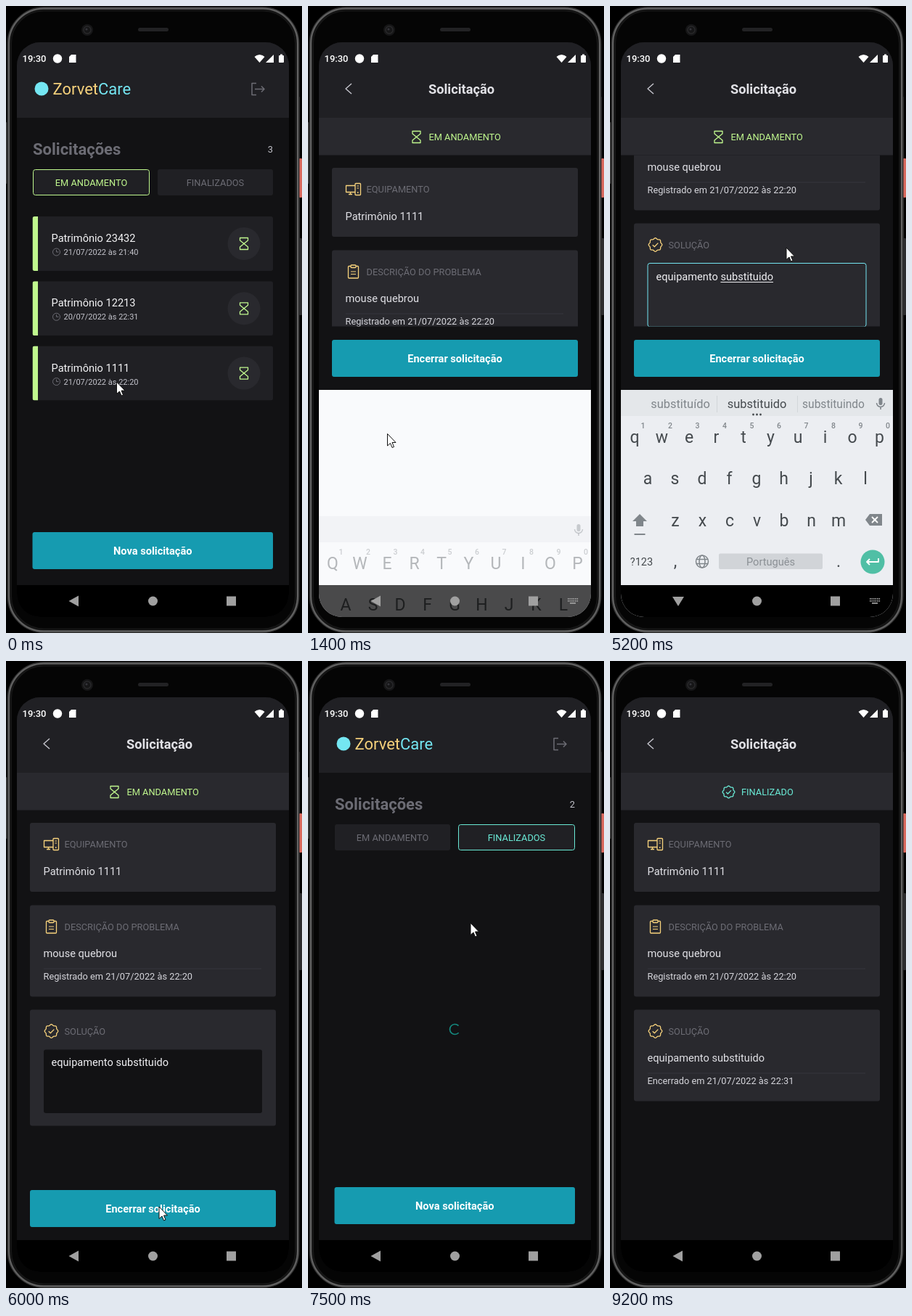
Write an HTML page with a canvas that moves like this. It is 408 px wide and 864 px high and loops after 9600 ms.

```html
<!DOCTYPE html>
<html lang="pt-BR">
<head>
<meta charset="utf-8">
<title>Solicitações</title>
<style>
html, body { margin: 0; width: 100%; height: 100%; overflow: hidden; background: #000; }
canvas { display: block; width: 408px; height: 864px; }
</style>
</head>
<body>
<canvas id="stage"></canvas>
<script>
const LOOP = 9600, STEP = 100;
const canvas = document.getElementById('stage');
const ctx = canvas.getContext('2d');
const ratio = window.devicePixelRatio || 1;
canvas.width = 408 * ratio;
canvas.height = 864 * ratio;

const C = {
  bg: '#121214', panel: '#202024', card: '#29292e', line: '#36363c',
  muted: '#6c6c74', soft: '#c4c4cc', text: '#e1e1e6', button: '#169bb0',
  open: '#c0f88e', done: '#6aead6', gold: '#f7d27c', sky: '#74e6f2', spin: '#14897f'
};
const SMALL = 12.8, BODY = 14.6;

// Drawing helpers
function box(x, y, w, h, r, fill, stroke, lw = 1) {
  ctx.beginPath();
  ctx.roundRect(x, y, w, h, r);
  if (fill) { ctx.fillStyle = fill; ctx.fill(); }
  if (stroke) { ctx.strokeStyle = stroke; ctx.lineWidth = lw; ctx.stroke(); }
}
function disc(x, y, r, fill) {
  ctx.beginPath();
  ctx.arc(x, y, r, 0, Math.PI * 2);
  ctx.fillStyle = fill;
  ctx.fill();
}
function ring(x, y, r, color, lw, from = 0, to = Math.PI * 2) {
  ctx.beginPath();
  ctx.arc(x, y, r, from, to);
  ctx.strokeStyle = color;
  ctx.lineWidth = lw;
  ctx.stroke();
}
function trace(points, x = 0, y = 0, close = false) {
  ctx.beginPath();
  points.forEach(([px, py], i) => i ? ctx.lineTo(x + px, y + py) : ctx.moveTo(x + px, y + py));
  if (close) ctx.closePath();
}
function line(points, x, y, color, lw = 1.4, close = false) {
  trace(points, x, y, close);
  ctx.strokeStyle = color;
  ctx.lineWidth = lw;
  ctx.stroke();
}
function shape(points, x, y, fill) {
  trace(points, x, y, true);
  ctx.fillStyle = fill;
  ctx.fill();
}
function setFont(size, weight = 400) {
  ctx.font = `${weight} ${size}px Roboto, sans-serif`;
}
function text(str, x, y, size, color, weight = 400, align = 'left') {
  setFont(size, weight);
  ctx.textAlign = align;
  ctx.fillStyle = color;
  ctx.fillText(str, x, y);
}
function clipTo(x, y, w, h, r, draw) {
  ctx.save();
  ctx.beginPath();
  ctx.roundRect(x, y, w, h, r);
  ctx.clip();
  draw();
  ctx.restore();
}

// Icons
function hourglass(x, y, color) {
  line([[-5.5, -8], [5.5, -8], [5.5, -4.5], [0, 0], [5.5, 4.5], [5.5, 8],
    [-5.5, 8], [-5.5, 4.5], [0, 0], [-5.5, -4.5]], x, y, color, 1.3, true);
}
function badge(x, y, color, size = 1) {
  const rim = Array.from({ length: 64 }, (_, i) => {
    const a = i / 64 * Math.PI * 2, r = size * (8.6 + 0.7 * Math.cos(8 * a));
    return [r * Math.cos(a), r * Math.sin(a)];
  });
  line(rim, x, y, color, 1.3, true);
  const tick = [[-3.8, 0.3], [-1.2, 2.8], [3.8, -2.4]];
  line(tick.map(p => p.map(v => v * size)), x, y, color, 1.3);
}
function computer(x, y, color) {
  box(x + 2.5, y - 8, 7.5, 16, 1, null, color, 1.3);
  line([[5, -4.5], [7.5, -4.5]], x, y, color, 1.2);
  line([[5, -1.5], [7.5, -1.5]], x, y, color, 1.2);
  disc(x + 6.25, y + 4.5, 0.9, color);
  line([[2.5, -5], [-10, -5], [-10, 4], [2.5, 4]], x, y, color, 1.3);
  line([[-4, 4], [-4, 7]], x, y, color, 1.3);
  line([[-6.5, 7], [-1.5, 7]], x, y, color, 1.3);
}
function clipboard(x, y, color) {
  box(x - 7, y - 7.5, 14, 16.5, 1, null, color, 1.3);
  box(x - 3.5, y - 9, 7, 3.5, 1, C.card, color, 1.3);
  line([[-3.5, 0], [3.5, 0]], x, y, color, 1.2);
  line([[-3.5, 3.5], [3.5, 3.5]], x, y, color, 1.2);
}
function mic(x, y, color) {
  box(x - 2.5, y - 8, 5, 10, 2.5, color);
  ring(x, y - 1, 5.5, color, 1.5, 0, Math.PI);
  line([[0, 4.5], [0, 8]], x, y, color, 1.6);
}
function spinner(x, y, t, color) {
  const a = (t - 7500) / 1000 * Math.PI * 2;
  ring(x, y, 7, color, 1.7, a + 0.75, a + 5.5);
}

function phone() {
  ctx.fillStyle = '#000';
  ctx.fillRect(0, 0, 408, 864);
  box(0, 160, 1.5, 85, 1, '#3a3a3a');
  box(403, 125, 2, 300, 1, '#303030');
  box(404, 210, 4, 54, 1, '#d9695d');
  box(404, 320, 4, 106, 1, '#2c2c2e');
  box(3.5, 3, 399, 859, 49, '#050505', '#303030', 4);
  box(4, 3.5, 398, 858, 48, null, '#626262', 2);
  box(7, 6.5, 392, 852, 45, null, '#161616', 2);
  disc(112, 33, 8, '#161617');
  ring(112, 33, 5, '#29292b', 1.5);
  disc(111, 32, 1.6, '#34343a');
  box(182, 30, 42, 5, 2.5, '#222224');
}

function statusBar() {
  text('19:30', 22.5, 77, 13, '#fff', 500);
  disc(71, 72.5, 6.2, '#fff');
  shape([[3, 0], [9.5, 0], [9.5, 11], [0, 11], [0, 3]], 87, 67, '#fff');
  shape([[0, 3], [3, 1], [7, 0], [11, 1], [14, 3], [7, 11]], 342.5, 67, '#fff');
  shape([[0, 11], [11, 0], [11, 11]], 358, 67, '#fff');
  box(376, 68, 7, 10, 1, '#fff');
  box(378, 66.5, 3, 2, 0, '#fff');
}

function navBar(withKeys, sliding) {
  ctx.fillStyle = sliding ? 'rgba(0,0,0,.7)' : '#000';
  ctx.fillRect(15, 798, 375, 44);
  const tone = '#a0a0a0';
  if (withKeys && !sliding) shape([[-8, -6], [8, -6], [0, 7]], 94, 820, tone);
  else shape([[-7.5, 0], [6, -7.5], [6, 7.5]], 94, 820, tone);
  disc(202.5, 820, 6.5, tone);
  box(304, 813.5, 13, 13, 0, tone);
  if (withKeys) {
    for (let i = 0; i < 12; i++) box(358 + (i % 6) * 2.5, 816 + Math.floor(i / 6) * 3, 1.6, 1.8, 0, tone);
    box(361, 822, 8, 1.8, 0, tone);
  }
}

function fillScreen() {
  ctx.fillStyle = C.bg;
  ctx.fillRect(15, 50, 375, 792);
}
function header() {
  ctx.fillStyle = C.panel;
  ctx.fillRect(15, 50, 375, 104);
}
function mainButton(label, x, y, w, busyAt) {
  const busy = busyAt !== undefined;
  ctx.globalAlpha = busy ? 0.5 : 1;
  box(x, y, w, 51, 3, C.button);
  if (busy) spinner(x + w / 2, y + 25.5, busyAt, '#fff');
  else text(label, x + w / 2, y + 30.5, BODY, '#fff', 700, 'center');
  ctx.globalAlpha = 1;
}

function filterTab(label, left, right, active, color) {
  const y = 225, h = 36;
  if (active) box(left + 0.5, y + 0.5, right - left - 1, h - 1, 3, C.panel, color);
  else box(left, y, right - left, h, 3, C.panel);
  text(label, (left + right) / 2, 248, SMALL, active ? color : C.muted, 400, 'center');
}

function orderCard([code, date], i, done) {
  const y = 290 + i * 89.3, color = done ? C.done : C.open;
  clipTo(36.5, y, 331.5, 75, 3, () => {
    box(36.5, y, 331.5, 75, 0, C.panel);
    box(36.5, y, 7.5, 75, 0, color);
  });
  text('Patrimônio ' + code, 62.5, y + 35, BODY, '#f4f4f6');
  ring(69.5, y + 49, 5, C.muted, 1);
  line([[0, -3], [0, 0], [3, 0]], 69.5, y + 49, C.muted, 1);
  text(date, 79.5, y + 53, 11, C.soft);
  disc(328, y + 37.5, 22.5, C.card);
  (done ? badge : hourglass)(328, y + 37.5, color);
}

function listScreen(t, { orders, count, done, loading }) {
  fillScreen();
  header();
  disc(49, 114, 9.5, C.sky);
  text('Zorvet', 64.5, 121.5, 22, C.gold);
  const brandWidth = ctx.measureText('Zorvet').width;
  text('Care', 64.5 + brandWidth, 121.5, 22, C.sky);
  line([[-2, -8], [-8, -8], [-8, 8], [-2, 8]], 347, 114.5, C.muted, 1.5);
  line([[-4, 0], [9, 0]], 347, 114.5, C.muted, 1.5);
  line([[5, -4], [9, 0], [5, 4]], 347, 114.5, C.muted, 1.5);
  text('Solicitações', 37, 205, 22, C.muted, 700);
  text(count, 368, 202, SMALL, C.soft, 400, 'right');
  filterTab('EM ANDAMENTO', 37, done ? 196 : 198, !done, C.open);
  filterTab('FINALIZADOS', done ? 207 : 209, 368, done, C.done);
  if (loading) spinner(202.5, 507.5, t, C.spin);
  else orders.forEach((order, i) => orderCard(order, i, done));
  mainButton('Nova solicitação', 36.5, 725, 331.5);
}

function loadingScreen(t) {
  fillScreen();
  spinner(202.5, 424, t, C.spin);
}

function infoCard(y, h, icon, label, body, footer) {
  box(33, y, 339, h, 3, C.card);
  icon(62.5, y + 29.5, C.gold);
  text(label, 80.5, y + 34, SMALL, C.muted);
  if (body) text(body, 51.5, y + 71.5, BODY, C.text);
  if (footer) {
    box(52, y + 87, 300, 1, 0, C.line);
    text(footer, 51.5, y + 102.5, SMALL, '#d6d6dc');
  }
}

function solutionInput(y, { first, second, focused }) {
  const shift = focused ? 1 : 0;
  box(52, y + 0.5, 301, 87.5, 3, focused ? C.card : C.bg, focused ? C.sky : null);
  const x = 62.5 + shift, base = y + 23 + shift;
  const lead = first + (second ? ' ' : '');
  text(lead + second, x, base, BODY, '#f0f0f3');
  if (!focused) return;
  const leadWidth = ctx.measureText(lead).width;
  const composing = second || (first.length < FIRST.length ? first : '');
  const start = second ? x + leadWidth : x;
  box(start, base + 2, ctx.measureText(composing).width, 1, 0, '#f0f0f3');
}

function detailsScreen(t, { closed, keys, scroll = 0, input, busy }) {
  fillScreen();
  header();
  line([[4, -7], [-4, 0], [4, 7]], 56, 114, C.soft, 1.4);
  text('Solicitação', 211.5, 120.5, 18.2, C.text, 700, 'center');
  box(15, 154, 375, 51.5, 0, C.card);
  if (closed) {
    badge(163.5, 180.5, C.done, 0.9);
    text('FINALIZADO', 181, 185, SMALL, C.done);
  } else {
    hourglass(149.5, 180.5, C.open);
    text('EM ANDAMENTO', 166.5, 185, SMALL, C.open);
  }
  clipTo(15, 205.5, 375, keys ? 236 : 592.5, 0, () => {
    ctx.translate(0, -scroll);
    infoCard(223, 95, computer, 'EQUIPAMENTO', 'Patrimônio 1111');
    infoCard(336.5, 126, clipboard, 'DESCRIÇÃO DO PROBLEMA', 'mouse quebrou', 'Registrado em 21/07/2022 às 22:20');
    if (closed) {
      infoCard(480.5, 126, badge, 'SOLUÇÃO', 'equipamento substituido', 'Encerrado em 21/07/2022 às 22:31');
    } else {
      infoCard(480.5, 160, badge, 'SOLUÇÃO');
      solutionInput(535, input);
    }
  });
  if (!closed) mainButton('Encerrar solicitação', 33, keys ? 460 : 729, 339, busy ? t : undefined);
}

function keyRow(letters, x, y, color) {
  [...letters].forEach((ch, i) => text(ch, x + i * 37.5, y, 23, color, 400, 'center'));
}

function suggestion(word, x, color, weight, maxWidth) {
  setFont(16.4, weight);
  const size = Math.min(16.4, 16.4 * maxWidth / ctx.measureText(word).width);
  text(word, x, 554, size, color, weight, 'center');
}

function keyboard({ drop, upper, words, bold }) {
  const ink = '#454a4e', gray = '#80868b';
  clipTo(15, 529, 375, 313, 0, () => {
    box(15, 529, 375, 313, 0, drop ? '#f9fafc' : '#eceef2');
    ctx.translate(0, drop);
    const fade = drop > 100 ? 0.38 : drop ? 0.7 : 1;
    ctx.globalAlpha = fade;
    box(15, 529, 375, 36, 0, '#e4e7ea');
    mic(373, 548, gray);
    if (words) {
      box(147, 537, 1, 23, 0, '#d2d6d9');
      box(258, 537, 1, 23, 0, '#d2d6d9');
      suggestion(words[0], 97, gray, 400, 86);
      suggestion(words[1], 202.5, ink, bold ? 700 : 400, 96);
      suggestion(words[2], 308, gray, 400, 86);
      for (let i = -1; i < 2; i++) disc(202.5 + i * 5, 563, 1.4, ink);
    }
    const put = s => upper ? s.toUpperCase() : s;
    keyRow(put('qwertyuiop'), 34, 602, ink);
    [...'1234567890'].forEach((n, i) => text(n, 45.5 + i * 37.5, 582, 10.5, gray, 500, 'center'));
    ctx.globalAlpha = Math.max(fade, 0.85);
    keyRow(put('asdfghjkl'), 52, 659, ink);
    keyRow(put('zxcvbnm'), 90, 717, ink);
    shape([[0, -9], [10, 1], [5, 1], [5, 8], [-5, 8], [-5, 1], [-10, 1]], 41, 709, gray);
    box(33.5, 727, 15, 2, 0, gray);
    shape([[-12, 0], [-6, -8], [11, -8], [11, 8], [-6, 8]], 364, 708, gray);
    line([[-3, -4], [5, 4]], 364, 708, '#fff', 1.8);
    line([[-3, 4], [5, -4]], 364, 708, '#fff', 1.8);
    text('?123', 43.5, 771, 14.5, ink, 400, 'center');
    text(',', 90, 773, 23, ink, 400, 'center');
    ring(127, 765.5, 8.5, gray, 1.5);
    ctx.beginPath();
    ctx.ellipse(127, 765.5, 4, 8.5, 0, 0, Math.PI * 2);
    ctx.stroke();
    line([[-8, -3], [8, -3]], 127, 765.5, gray, 1.3);
    line([[-8, 3], [8, 3]], 127, 765.5, gray, 1.3);
    box(150, 754.5, 143, 21.5, 2, '#d1d4d8');
    text('Português', 221.5, 770.5, 14.6, '#8b9095', 400, 'center');
    text('.', 315, 773, 23, ink, 400, 'center');
    disc(362, 766, 16.5, '#50bfa5');
    line([[8, -5], [8, 0], [-8, 0]], 362, 766, '#fff', 1.8);
    line([[-4, -4], [-8, 0], [-4, 4]], 362, 766, '#fff', 1.8);
  });
}

// Pointer stops: time, x, y
const POINTER = [
  [0, 152.5, 518], [800, 152.5, 518], [1200, 109.5, 589.5], [4900, 109.5, 589.5],
  [5200, 243, 333], [5400, 243, 333], [5900, 211, 752], [6500, 211, 752],
  [7000, 286, 243], [7200, 286, 243], [7500, 224, 361], [8000, 224, 361], [8200, 220, 334]
];
function along(stops, t) {
  const next = stops.findIndex(s => s[0] > t);
  if (next < 0) return stops[stops.length - 1].slice(1);
  const [t0, ...a] = stops[next - 1], [t1, ...b] = stops[next];
  const u = (t - t0) / (t1 - t0), e = u * u * (3 - 2 * u);
  return a.map((v, i) => v + (b[i] - v) * e);
}
function pointer(t) {
  if (t >= 9000) return;
  const [x, y] = along(POINTER, t);
  const arrow = [[0, 0], [0, 16.5], [4, 13], [6.5, 19], [9, 18], [6.5, 12], [11.5, 12]];
  shape(arrow, x, y, '#fff');
  line(arrow, x, y, '#111', 1, true);
}

const ORDERS = [
  ['23432', '21/07/2022 às 21:40'],
  ['12213', '20/07/2022 às 22:31'],
  ['1111', '21/07/2022 às 22:20']
];
const FIRST = 'equipamento', SECOND = 'substituido';
const typed = (word, start, t) => word.slice(0, Math.max(0, Math.floor((t - start) / STEP) + 1));

function editing(t) {
  const keys = t >= 1400 && t < 5400;
  const first = typed(FIRST, 2200, t), second = typed(SECOND, 3500, t);
  const [scroll] = along([[0, 0], [1500, 0], [1800, 181]], t);
  detailsScreen(t, {
    keys, scroll: keys ? scroll : 0, busy: t >= 6200,
    input: { first, second, focused: keys }
  });
  if (!keys) return navBar(false);
  const drop = t < 1500 ? 174 : t < 1600 ? 55 : t >= 5300 ? 110 : 0;
  const word = second || first;
  const complete = word.length > 5;
  const sides = second ? ['substituído', 'substituindo'] : ['equipamentos', 'equipa mento'];
  keyboard({
    drop, upper: !first, bold: !second,
    words: word && !drop ? [complete ? sides[0] : '', word, complete ? sides[1] : ''] : null
  });
  navBar(true, drop > 0);
}

function scene(t) {
  if (t >= 800 && t < 6600) return editing(t);
  if (t < 500) listScreen(t, { orders: ORDERS, count: '3', done: false });
  else if (t < 800) loadingScreen(t);
  else if (t < 7200) listScreen(t, { orders: ORDERS.slice(0, 2), count: '2', done: false });
  else if (t < 7800) listScreen(t, { orders: [], count: '2', done: true, loading: true });
  else if (t < 8400) listScreen(t, { orders: ORDERS.slice(2), count: '1', done: true });
  else if (t < 8700) loadingScreen(t);
  else detailsScreen(t, { closed: true });
  navBar(false);
}

function render(now) {
  const t = Math.floor(now % LOOP / STEP) * STEP;
  ctx.setTransform(ratio, 0, 0, ratio, 0, 0);
  ctx.lineJoin = 'round';
  phone();
  clipTo(15, 50, 375, 792, 32, () => {
    scene(t);
    statusBar();
  });
  pointer(t);
}

const started = performance.now();
function tick() {
  render(performance.now() - started);
  requestAnimationFrame(tick);
}
tick();
</script>
</body>
</html>
```
